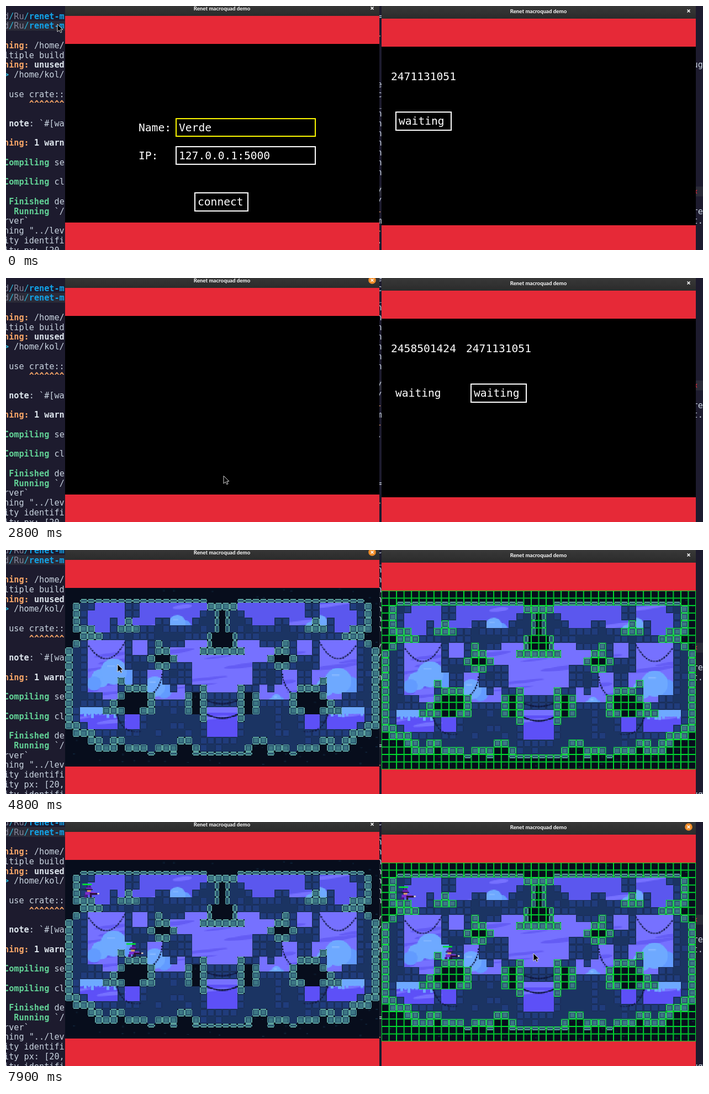
Animation, 1262 px wide and 444 px high, one loop 8000 ms. Source, as an HTML page with a canvas:

```html
<!DOCTYPE html>
<html lang="en">
<head>
<meta charset="utf-8">
<title>Renet macroquad demo</title>
<style>
  html, body { margin: 0; width: 100%; height: 100%; overflow: hidden; background: #1d1b2e; }
  canvas { display: block; }
</style>
</head>
<body>
<canvas id="stage" width="1262" height="444"></canvas>
<script>
const LOOP = 8000;
const MONO = '"DejaVu Sans Mono", monospace';
const C = {
  term: '#1d1b2e', band: '#2b2b38', text: '#c9d4e0', bold: '#dfe7ee', grey: '#85869a',
  cyan: '#2bb5d8', blue: '#12a4ea', orange: '#f7a668', green: '#62d196', red: '#e62937',
  white: '#ffffff', yellow: '#fdf900', dim: '#505050', grid: '#00e430'
};
const ctx = document.getElementById('stage').getContext('2d');

// Terminal lines: row, then [column, text, colour, bold] runs.
const LOG = [
  ...[0, 1].map(row => [row, [0, 'd', C.grey], [1, '/', C.cyan], [2, 'Ru', C.grey], [4, '/', C.cyan], [5, 'renet-m', C.blue, 1]]),
  [3, [0, 'ning:', C.orange, 1], [6, '/home/']],
  [4, [0, 'ltiple build']],
  [5, [0, 'ning:', C.orange, 1], [6, 'unused', C.bold, 1]],
  [6, [0, '>', C.cyan, 1], [2, '/home/kol/']],
  [8, [1, 'use crate::']],
  [9, [5, '^^^^^^^', C.orange, 1]],
  [11, [1, 'note', C.bold, 1], [5, ': `#[wa']],
  [13, [0, 'ning:', C.orange, 1], [6, '1 warn', C.bold, 1]],
  [15, [0, 'Compiling', C.green, 1], [10, 'se']],
  [17, [0, 'Compiling', C.green, 1], [10, 'cl']],
  [19, [1, 'Finished', C.green, 1], [10, 'de']],
  [20, [2, 'Running', C.green, 1], [10, '`/']],
  [21, [0, 'rver`']],
  [22, [0, 'ning "../lev']],
  [23, [0, 'ity identifi']],
  [24, [0, 'ity px: [20,']],
  [25, [0, 'ity identifi']]
];
const STRIP = '= -    ec_nnnnnnn //-m-.    = -';
const EDGE = [[5, 'ug'], [18, '×', C.red], [20, 're'], [21, 't.'], [33, 'ug']];

// Left half of the level; the right half mirrors it.
// # dark rock, o rim stone, w back wall, . sky
const HALF = [
  '#####################',
  '##ooooooooooooooooo##',
  '#oww....ww.........oo',
  '#ow.....ww........wwo',
  '#ow...w.o...ww...wwwo',
  '#ooo..wooowwwwwwwwwwo',
  '##ooowwwwwwwwwwwwwwo#',
  '#ow.....w..wowww...o#',
  'oww.....w..woo....ooo',
  'oww.....wwwo##o......',
  'oww.....wwwwoowww....',
  'oww......ww..wwww....',
  'oww....o.ww..wwww....',
  'oww....wooo...w.wwo..',
  'owwww..o###o....o#oww',
  'owwwwwo####owwwwo#oww',
  'ow...ooo##oowwwwo#o..',
  'ow.....w..wwwwwwwwo..',
  'oow....w..wwwwwwwww..',
  '#ooowwwwwwwwwwwwwww..',
  '###oowoowwwwwwwoowwww',
  '####ooo#ooowooo##owww',
  '###########o##o##oooo',
  '#####################'
];
const COLS = 42, ROWS = 24, TILE = 8;
const LW = COLS * TILE, LH = ROWS * TILE;
const MAP = HALF.map(row => row + [...row].reverse().join(''));
const isSky = (c, r) => (MAP[r] && MAP[r][c]) === '.';
const isSolid = kind => kind === '#' || kind === 'o';

function eachTile(fn) {
  MAP.forEach((row, r) => [...row].forEach((kind, c) => fn(kind, c, r)));
}

function seeded(seed) {
  return () => (seed = seed * 16807 % 2147483647) / 2147483647;
}

function buildLevel() {
  const cv = document.createElement('canvas');
  cv.width = LW;
  cv.height = LH;
  const g = cv.getContext('2d');
  const rnd = seeded(77);
  const box = (color, x, y, w, h) => { g.fillStyle = color; g.fillRect(x, y, w, h); };
  const stone = (outer, inner, x, y, w, h) => {
    box(outer, x + 1, y, w - 2, h);
    box(outer, x, y + 1, w, h - 2);
    box(inner, x + 1, y + 1, w - 2, h - 2);
  };

  // Sky with wind streaks
  box('#5b57ee', 0, 0, LW, 54);
  box('#7671ff', 0, 54, LW, 80);
  box('#5d50f7', 0, 134, LW, 58);
  for (let i = 0; i < 46; i++) {
    const x = rnd() * LW, y = 16 + rnd() * 145, w = 16 + rnd() * 45;
    g.fillStyle = y < 54 || y > 134 ? '#7671ff' : '#645cf4';
    g.beginPath();
    g.ellipse(x, y, w / 2, 1 + rnd() * 1.6, -0.12, 0, 7);
    g.fill();
  }
  const clouds = [[52, 90, 14], [96, 106, 11], [120, 38, 9], [272, 38, 9], [292, 100, 14], [226, 119, 5]];
  for (const [x, y, r] of clouds) {
    [[-1, .5, .7], [.9, .4, .75], [0, 0, 1], [-1.5, .9, .55]].forEach(([dx, dy, k], i) => {
      g.fillStyle = i % 2 ? '#629bff' : '#6ea9ff';
      g.beginPath();
      g.arc(x + dx * r, y + dy * r, r * k, 0, 7);
      g.fill();
    });
    box('#86b8ff', x - r * .5, y - r * .5, r * .6, 1.5);
  }
  for (const x of [16, LW - 56]) {
    box('#6ea9ff', x, 126, 40, 9);
    for (let dx = 0; dx < 40; dx += 4) box('#6ea9ff', x + dx, 135, 3, rnd() * 5);
  }

  eachTile((kind, c, r) => {
    if (kind !== 'w') return;
    const x = c * TILE, y = r * TILE;
    box('#1b3463', x, y, TILE, TILE);
    const edge = [[1, 0], [-1, 0], [0, 1], [0, -1]].some(([dx, dy]) => isSky(c + dx, r + dy));
    if (edge || rnd() < .25) stone('#1a2f5c', '#203c7c', x, y, TILE, TILE);
  });

  // Hanging chains
  g.strokeStyle = '#11183f';
  g.lineWidth = 1.4;
  g.setLineDash([2, 1]);
  const chains = [[25, 62, 46, 92, 64, 58], [104, 92, 102, 108, 92, 114], [55, 136, 62, 158, 82, 154], [152, 136, 168, 144, 184, 136], [152, 121, 168, 128, 184, 121]];
  for (const side of [1, -1]) {
    g.save();
    if (side < 0) { g.translate(LW, 0); g.scale(-1, 1); }
    for (const [x, y, cx, cy, ex, ey] of chains) {
      g.beginPath();
      g.moveTo(x, y);
      g.quadraticCurveTo(cx, cy, ex, ey);
      g.stroke();
    }
    g.restore();
  }

  // Rock and rim stones; floor, ceiling and pillar have thin rims
  eachTile((kind, c, r) => {
    if (!isSolid(kind)) return;
    let x = c * TILE, y = r * TILE, w = TILE, h = TILE;
    box('#070d1c', x, y, w, h);
    if (rnd() < .2) box('#10263c', x + rnd() * 5, y + rnd() * 5, 2, 1);
    if (kind === '#') return;
    if (r === 1) { y += 4; h = 4; }
    else if (r === 22) h = 4;
    else if (r > 2 && r < 8 && c > 18 && c < 23) {
      w = 5;
      if (c > 20) x += 3;
    }
    stone('#5b9f9b', '#2a5770', x, y, w, h);
    if (w > 5 && h > 4) box('#3d7885', x + 2, y + 2, w - 4, h - 4);
  });
  return cv;
}

const level = buildLevel();

function fill(color, x, y, w, h) {
  ctx.fillStyle = color;
  ctx.fillRect(x, y, w, h);
}

function write(str, x, y, color, font, align = 'left') {
  ctx.font = font;
  ctx.fillStyle = color;
  ctx.textAlign = align;
  ctx.fillText(str, x, y);
}

function frame(color, x, y, w, h) {
  ctx.strokeStyle = color;
  ctx.lineWidth = 2;
  ctx.strokeRect(x + 1, y + 1, w - 2, h - 2);
}

const label = (str, x, y, color = C.white) => write(str, x, y, color, `19.6px ${MONO}`);

function drawTerminals(t) {
  const rowY = row => 18 + 17.75 * row;
  const shell = (str, x, row, color = C.text, bold) =>
    write(str, x, rowY(row) + 5.5, color, `${bold ? 'bold ' : ''}15.2px ${MONO}`);
  const up = t < 4800 ? 0 : 1;
  const upRight = t < 2800 ? 0 : t < 4800 ? 8 : 9;
  fill(C.term, 0, 0, 1262, 444);
  fill(C.band, 0, rowY(1 - up) - 9, 107, 18);
  fill(C.band, 676, rowY(18 - upRight) - 9, 586, 18);
  for (const [row, ...runs] of LOG)
    for (const [col, str, color, bold] of runs) shell(str, -4 + col * 9.15, row - up, color, bold);
  [...STRIP].forEach((ch, row) => shell(ch, 671.5, row - upRight, ch === '-' ? C.orange : C.text));
  for (const [row, str, color] of EDGE) shell(str, 1243.5, row - upRight, color);
}

function drawWindow(x, barH, focused) {
  const bar = ctx.createLinearGradient(0, barH - 24, 0, barH);
  bar.addColorStop(0, '#393939');
  bar.addColorStop(1, '#2b2b2b');
  fill(bar, x, 0, 569, barH);
  fill(C.red, x, barH, 569, 444);
  fill('#000', x, barH + 51, 569, 325);
  write('Renet macroquad demo', x + 284, barH - 10, C.white, 'bold 9.7px Lato, sans-serif', 'center');

  const cx = x + 556, cy = barH - 14;
  if (focused) {
    ctx.fillStyle = '#f08c28';
    ctx.beginPath();
    ctx.arc(cx, cy, 6.8, 0, 7);
    ctx.fill();
  }
  ctx.strokeStyle = C.white;
  ctx.lineWidth = 1.5;
  ctx.beginPath();
  for (const s of [1, -1]) {
    ctx.moveTo(cx - 2.5, cy - 2.5 * s);
    ctx.lineTo(cx + 2.5, cy + 2.5 * s);
  }
  ctx.stroke();
}

function button(str, x, y, w, mouse) {
  const over = mouse.x > x && mouse.x < x + w && mouse.y > y && mouse.y < y + 35;
  const color = over ? C.dim : C.white;
  frame(color, x, y, w, 35);
  label(str, x + 6, y + 24, color);
}

function drawForm(mouse) {
  label('Name:', 240, 228);
  label('IP:', 240, 279);
  frame(C.yellow, 307, 204, 254, 34);
  frame(C.white, 307, 255, 254, 34);
  label('Verde', 313, 228);
  label('127.0.0.1:5000', 313, 279);
  button('connect', 341, 339, 98, mouse);
}

// Players are columns 136 px apart; own is the column with a button.
function drawLobby(x, y, players, own, mouse) {
  players.forEach(([id, state], i) => {
    const px = x + 17 + i * 136;
    label(id, px, y + 61);
    if (i === own) button(state, px + 8, y + 118, 102, mouse);
    else label(state, px + 8, y + 142);
  });
}

function drawPlayer(x, y) {
  const part = (color, dx, dy, w, h) => fill(color, x + dx, y + dy, w, h);
  part(C.grid, -7, -8, 10, 1.6);
  part('#4a1787', -1, -6, 3, 2);
  part('#6a22b8', -3, -4, 6, 2);
  part('#2a1036', -4, -2, 8, 1);
  part('#d59a6a', -2, -1, 4, 2);
  part('#7d2bd0', -4, 1, 8, 3);
  part('#2a1036', 1, 2, 8, 2);
  part('#8f3fe0', 3, 1, 4, 1);
  part('#e8d8c0', 9, 2, 2, 1.5);
  part('#4a1787', -5, 4, 3, 3);
  part('#2a1036', 1, 4, 2, 3);
}

function drawGame(x, y, showGrid, showPlayers) {
  const k = 569 / LW;
  ctx.save();
  ctx.translate(x, y);
  ctx.scale(k, k);
  ctx.imageSmoothingEnabled = false;
  ctx.drawImage(level, 0, 0);
  if (showPlayers) {
    drawPlayer(25.5, 33.5);
    drawPlayer(72.5, 97.5);
  }
  ctx.restore();
  if (!showGrid) return;
  const s = TILE * k;
  ctx.strokeStyle = C.grid;
  ctx.lineWidth = 1;
  eachTile((kind, c, r) => {
    if (isSolid(kind)) ctx.strokeRect(x + c * s + .5, y + r * s + .5, s - 1, s - 1);
  });
}

// Pointer path: time, x, y
const PATH = [
  [0, 93, 33], [100, 230, 120], [200, 361, 216], [300, 361, 216], [600, 383, 217], [800, 383, 217],
  [900, 388, 222], [1100, 388, 222], [1200, 395, 306], [1500, 392, 361], [1800, 394, 360], [2900, 394, 360],
  [3400, 800, 240], [3700, 890, 212], [3800, 890, 212], [4100, 700, 240], [4600, 202, 208], [5000, 202, 208],
  [5300, 409, 211], [5400, 409, 211], [5800, 956, 237], [7600, 956, 237], [7900, 955, 239], [LOOP, 955, 239]
];

function pointer(t) {
  const step = Math.floor(t / 100) * 100;
  const i = PATH.findIndex(p => p[0] > step);
  const [t0, x0, y0] = PATH[i - 1], [t1, x1, y1] = PATH[i];
  const k = (step - t0) / (t1 - t0);
  return { x: x0 + (x1 - x0) * k, y: y0 + (y1 - y0) * k };
}

const ARROW = new Path2D('M0 0V14L3.4 11L5.8 15.6L8 14.5L5.7 10H10Z');

function drawPointer({ x, y }) {
  ctx.save();
  ctx.translate(x, y);
  ctx.fillStyle = '#000';
  ctx.strokeStyle = '#d8d8d8';
  ctx.lineWidth = 1;
  ctx.fill(ARROW);
  ctx.stroke(ARROW);
  ctx.restore();
}

function draw(t) {
  const mouse = pointer(t);
  const left = { x: 107, y: 69 }, right = { x: 680, y: 74 };
  drawTerminals(t);
  drawWindow(left.x, 18, mouse.x > 107 && mouse.x < 678);
  drawWindow(right.x, 23, mouse.x >= 678);

  const host = ['2471131051', t < 3800 ? 'waiting' : 'ready'];
  const guest = ['2458501424', 'waiting'];
  if (t >= 4800) {
    drawGame(left.x, left.y, false, t >= 7700);
    drawGame(right.x, right.y, true, t >= 7700);
  } else {
    if (t < 2800) drawForm(mouse);
    else if (t >= 3000) drawLobby(left.x + 1, left.y, [guest, host], 0, mouse);
    const joined = t >= 2800;
    drawLobby(right.x, right.y, joined ? [guest, host] : [host], joined ? 1 : 0, mouse);
  }
  drawPointer(mouse);
}

const start = performance.now();
function tick() {
  draw((performance.now() - start) % LOOP);
  requestAnimationFrame(tick);
}
tick();
</script>
</body>
</html>
```
